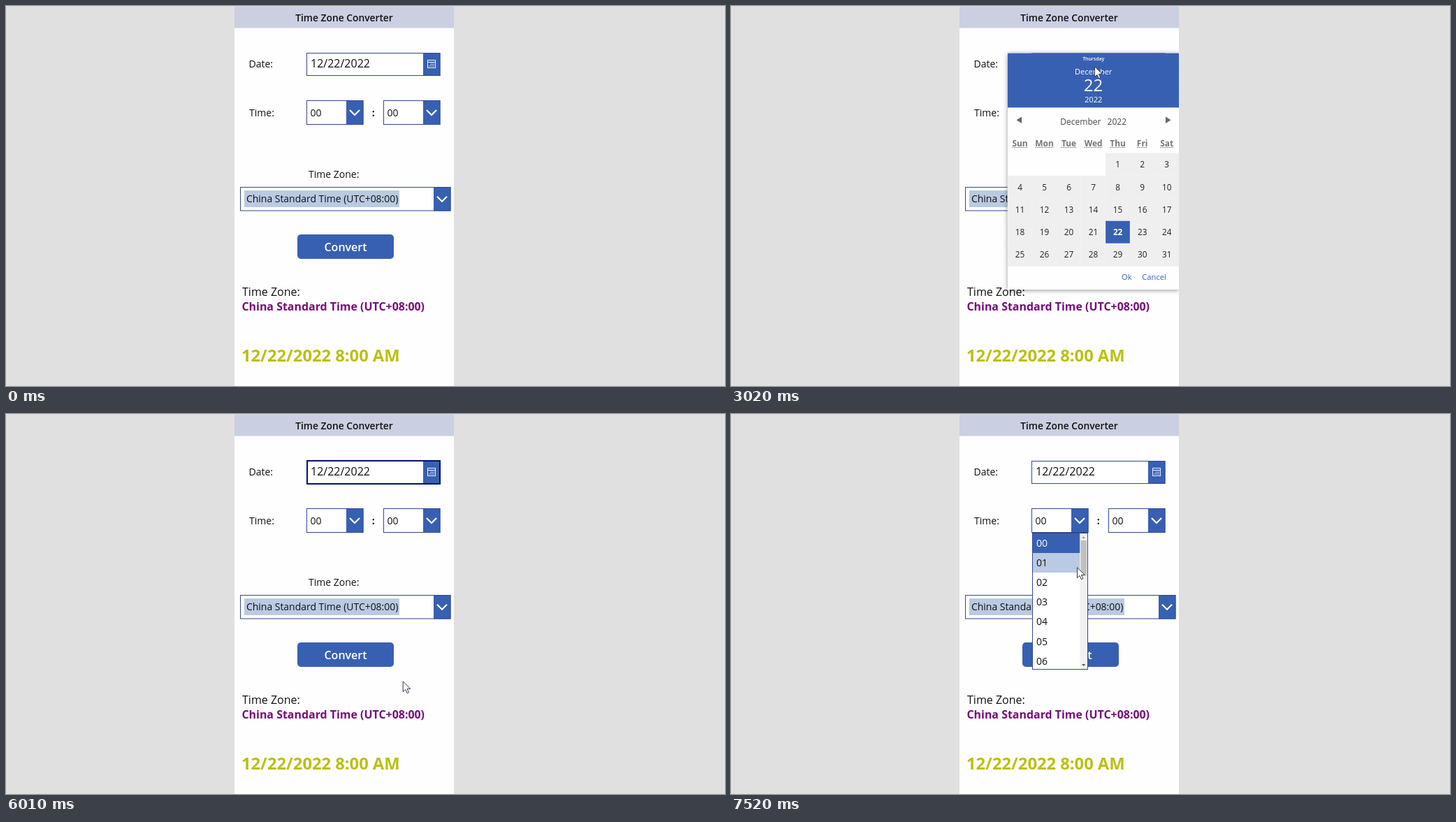
An HTML page for the animation above (8 s loop, 1029 px wide and 544 px high).

```html
<!DOCTYPE html>
<html lang="en">
<head>
<meta charset="utf-8">
<title>Time Zone Converter</title>
<style>
html, body { margin: 0; width: 100%; height: 100%; overflow: hidden; background: #e0e0e0; }
svg { display: block; font-family: "Open Sans", sans-serif; }
text { white-space: pre; }
#popup { filter: drop-shadow(0 1px 3px rgba(0, 0, 0, .42)); }
</style>
</head>
<body>
<svg id="stage" width="1029" height="544" viewBox="0 0 1029 544"></svg>
<script>
const BLUE = '#3860b2', NAVY = '#00126b', EDGE = '#33478f', HOVER = '#bacae2', INK = '#111';
const LOOP = 8000;

const rect = (x, y, w, h, fill, more = '') =>
  `<rect x="${x}" y="${y}" width="${w}" height="${h}" fill="${fill}" ${more}/>`;
const frame = (x, y, w, h) => rect(x + .5, y + .5, w - 1, h - 1, 'none', `stroke="${EDGE}"`);
const text = (x, y, size, str, fill = INK, weight = 400, anchor = 'start') =>
  `<text x="${x}" y="${y}" font-size="${size}" fill="${fill}" font-weight="${weight}" text-anchor="${anchor}">${str}</text>`;
const mid = (x, y, size, str, fill, weight) => text(x, y, size, str, fill, weight, 'middle');
const path = (d, fill, more = '') => `<path d="${d}" fill="${fill}" ${more}/>`;
const group = (id, body) => `<g id="${id}">${body}</g>`;

const chevron = (x, y) => path(`M${x - 7} ${y - 3.5}l7 7 7-7`, 'none', 'stroke="#fff" stroke-width="2.2"');

function dropdown(x, y, w, h) {
  return rect(x, y, w, h, '#fff') + rect(x + w - 24.5, y, 24.5, h, BLUE) +
    frame(x, y, w, h) + chevron(x + w - 12.5, y + h / 2);
}

function calendarIcon() {
  let dots = '';
  for (let i = 1; i < 8; i++) {
    dots += rect(605.3 + i % 4 * 2.1, i < 4 ? 82.6 : 85.2, 1.2, 1.3, '#fff');
  }
  return rect(603.5, 77.5, 11, 11, 'none', 'stroke="#fff" stroke-opacity=".9"') +
    rect(604, 80, 10, 1, '#fff') + dots;
}

function form() {
  const zone = 'China Standard Time (UTC+08:00)';
  return rect(327, 1, 314, 543, '#fefefe') + rect(327, 1, 314, 30.5, '#cacfe1') +
    mid(484, 21.5, 13.8, 'Time Zone Converter', INK, 600) +
    text(347.5, 88, 14, 'Date:') +
    rect(430, 67, 191.5, 33, '#fff') + rect(597, 67, 24.5, 33, BLUE) + frame(430, 67, 191.5, 33) +
    text(436, 88, 16, '12/22/2022') + calendarIcon() +
    text(348, 158, 14, 'Time:') +
    dropdown(430, 135, 81.5, 35) + text(435.5, 158, 14, '00') +
    text(523.8, 158, 14, ':', INK, 700) +
    dropdown(540, 135, 81.5, 35) + text(545.5, 158, 14, '00') +
    text(433, 246, 14, 'Time Zone:') +
    dropdown(335, 259, 301.5, 34.5) + rect(341, 264, 222, 24, HOVER) +
    text(344, 281, 13.95, zone) +
    rect(417, 327, 138, 35, BLUE, 'rx="5"') + mid(486, 351, 16, 'Convert', '#fff', 600) +
    text(338, 414.5, 16, 'Time Zone:') +
    text(337.4, 436, 15.95, zone, '#740f78', 700) +
    text(337, 509, 23.75, '12/22/2022 8:00 AM', '#bbc010', 700);
}

function popup() {
  const col = i => 413.5 + i * 35.03, top = r => 210.8 + r * 32.3;
  const names = { Sun: 22, Mon: 26, Tue: 22, Wed: 26, Thu: 22, Fri: 15, Sat: 19 };
  let out = rect(396, 67.6, 245, 338.4, '#fefefe') + rect(396, 67.6, 245, 77.8, BLUE) +
    mid(518.7, 78.3, 6.9, 'Thursday', '#fff', 600) + mid(518.7, 97.5, 11, 'December', '#fff') +
    mid(518.5, 122, 24, '22', '#fff') + mid(518.7, 138, 11.2, '2022', '#fff') +
    path('M416 158.5v9.5l-7.5-4.8z', '#666') + path('M622 158.5v9.5l7.5-4.8z', '#666') +
    text(471.3, 169.5, 12, 'December', '#484848') + text(538.6, 169.5, 12, '2022', '#484848');
  Object.entries(names).forEach(([name, w], i) => {
    out += mid(col(i), 200.5, 11.9, name, '#757575', 700) +
      path(`M${col(i) - w / 2} 202.5h${w}`, 'none', 'stroke="#757575" stroke-dasharray="1.5 1"');
  });
  for (let day = 1; day <= 31; day++) {
    const i = (day + 3) % 7, r = Math.floor((day + 3) / 7), on = day === 22;
    out += rect(396 + i * 35.03, top(r), 35.03, 32.3, on ? BLUE : '#efefef', on ? '' : 'stroke="#f2f2f2" stroke-width=".6"') +
      mid(col(i), top(r) + 20.4, 11.8, day, on ? '#fff' : '#222', on ? 700 : 400);
  }
  return out + text(559, 391.8, 11.2, 'Ok', BLUE) + text(588.3, 391.8, 11.2, 'Cancel', BLUE);
}

const focusRing = rect(431, 67, 190, 33, 'none', `stroke="${NAVY}" stroke-width="2"`);

const pressed = rect(431, 136, 56, 33, NAVY) + rect(487, 136, 24, 33, '#2c4a8c') +
  text(435.5, 158, 14, '00', '#fff') + chevron(499, 152.5) +
  '<circle cx="502" cy="161.5" r="11.3" fill="#e6df1e" fill-opacity=".58"/>';

function hours() {
  let out = rect(431.5, 170.5, 79, 195, '#fff') +
    rect(432, 171, 67.5, 28, BLUE) + rect(432, 199, 67.5, 28, HOVER);
  for (let i = 0; i < 7; i++) {
    out += text(437, 190 + i * 28.1, 14, '0' + i, i ? INK : '#fff');
  }
  return out + rect(499.5, 171, 11, 194, '#f1f1f1') + rect(500.5, 181, 8.5, 50.5, '#c0c0c0') +
    path('M502 178l2.6-3 2.6 3z', '#a0a0a0') + path('M502 358l2.6 3 2.6-3z', '#505050') +
    frame(431, 170, 80, 196);
}

const outline = 'stroke="#30364c" stroke-linejoin="round"';
const cursors =
  group('arrow', path('M.5.8V15.6L4 12.4 6.4 17.7 8.8 16.6 6.4 11.4H11.2Z', '#fff', outline)) +
  group('hand', path('M5 13V2.2a1.6 1.6 0 0 1 3.2 0V8L14 9.5q1.5.5 1.5 2.5v3q0 2-1.5 5.5H6.5l-1-2L1 13.5Q.2 11.8 2 11.3q1.5-.1 3 1.7Z', '#fff', outline) +
    path('M8.2 7.5V11M10.7 8.7V11.3M13.2 9.4V11.6', 'none', outline)) +
  group('beam', path('M1 .5H4M5 .5H8M4.5 1V16M1 16.5H4M5 16.5H8', 'none', 'stroke="#222"'));

const stage = document.getElementById('stage');
stage.innerHTML = '<clipPath id="panel"><rect x="327" width="314" height="544"/></clipPath>' +
  form() + group('focus', focusRing) + group('press', pressed) + group('list', hours()) +
  `<g clip-path="url(#panel)">${group('popup', popup())}</g>` + cursors;

// start time, cursor, x, y, visible layer
const steps = [
  [0],
  [500, 'arrow', 651, 200],
  [990, 'arrow', 410, 84],
  [1520, 'beam', 438, 15],
  [2010, 'arrow', 590, 66],
  [2510, 'hand', 602.5, 85],
  [3020, 'arrow', 520, 86, 'popup'],
  [3520, 'hand', 526.5, 254, 'popup'],
  [4010, 'hand', 554, 330, 'popup'],
  [4520, 'hand', 582, 323, 'popup'],
  [5030, 'hand', 554, 320, 'popup'],
  [5520, 'hand', 560, 376, 'popup'],
  [6010, 'arrow', 567.7, 382, 'focus'],
  [6510, 'arrow', 502, 188, 'focus'],
  [7000, 'arrow', 502.5, 162, 'press'],
  [7520, 'arrow', 495, 219, 'list'],
];
const parts = ['arrow', 'hand', 'beam', 'popup', 'focus', 'press', 'list'].map(id => document.getElementById(id));

function draw() {
  const t = performance.now() % LOOP;
  const [, cursor, x, y, layer] = steps.findLast(s => s[0] <= t);
  for (const part of parts) {
    part.style.display = part.id === cursor || part.id === layer ? '' : 'none';
    if (part.id === cursor) part.setAttribute('transform', `translate(${x} ${y})`);
  }
  requestAnimationFrame(draw);
}
draw();
</script>
</body>
</html>
```
